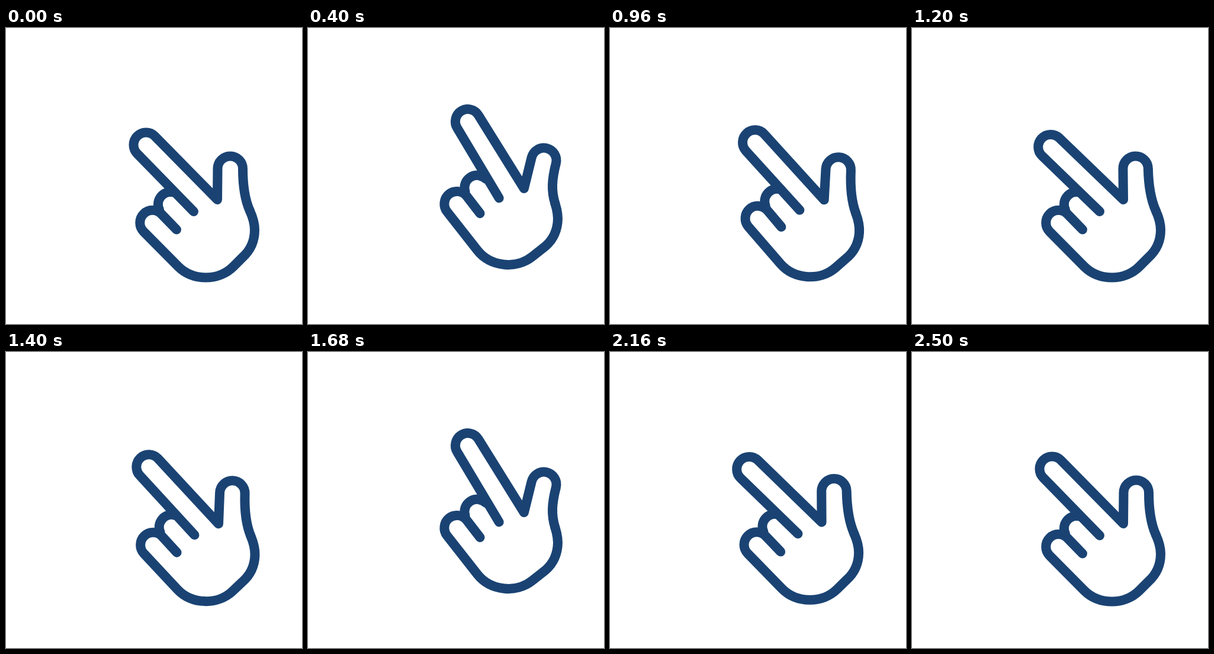
Recreate the animation shown at these times as an HTML page without scripts. Size 500x500 px, loop 3 s.

```html
<!DOCTYPE html>
<html lang="en">
<head>
<meta charset="utf-8">
<title>Tapping hand</title>
<style>
  html, body { margin: 0; width: 100%; height: 100%; overflow: hidden; background: #fff; }
  svg { display: block; width: 100vw; height: 100vh; }

  path {
    fill: none;
    stroke: #1a4373;
    stroke-width: 16;
    stroke-linecap: round;
    stroke-linejoin: round;
  }

  .hand {
    transform-box: view-box;
    transform-origin: 348px 359px;
    animation: lift 3s linear infinite, tilt 3s linear infinite;
  }
  .digits { animation: flex 3s linear infinite; }
  .knuckle { animation: follow 3s linear infinite; }

  @keyframes lift {
    0%, 33.3%, 46.667%, 76%, 100% { translate: 0 0; }
    5.333% { translate: 0 0; animation-timing-function: ease-in-out; }
    13.333%, 58.667% { translate: 0 -20.5px; animation-timing-function: ease-in; }
    22% { translate: 0 -9.5px; animation-timing-function: ease-out; }
    32% { translate: 0 -.5px; }
    46.667% { animation-timing-function: ease-in-out; }
    56% { translate: 0 -20.5px; }
    64.667% { translate: 0 -15.3px; animation-timing-function: cubic-bezier(.3, .3, .6, 1); }
  }

  @keyframes tilt {
    0%, 38.333%, 40.667%, 74.667%, 100% { rotate: 0deg; }
    5.333% { rotate: 0deg; animation-timing-function: ease-in-out; }
    13.333%, 58.667% { rotate: 6.6deg; animation-timing-function: ease-in; }
    22% { rotate: 3.6deg; }
    32% { rotate: 3.9deg; animation-timing-function: ease-in-out; }
    40.667% { animation-timing-function: ease-in; }
    46.667% { rotate: 1.65deg; animation-timing-function: ease-out; }
    56% { rotate: 6.6deg; }
    64.667% { rotate: 4.95deg; animation-timing-function: cubic-bezier(.3, .3, .6, 1); }
  }

  /* Poses of finger and thumb: rest, raised, pressed */
  @keyframes flex {
    0%, 5.333%, 24%, 44%, 46.667%, 69.333%, 83.333%, 100% {
      d: path("M317 310L221.7 212.4A1 1 0 0 1 251.3 182.6L357 290L357.5 237.7A1 1 0 0 1 400 237.7C400 264 403 289 412 309");
    }
    13.333%, 56%, 58.667% {
      d: path("M317 311L233.2 201.6A1 1 0 0 1 266.2 175.8L357 290L363.8 236.4A1 1 0 0 1 405.8 242C402 269 403 289 412 309");
    }
    37%, 73.333% {
      d: path("M317 310L218.2 218.9A1 1 0 0 1 246.8 188.1L357 290L355.6 238.2A1 1 0 0 1 398 237.2C399 264 403 289 412 309");
    }
    5.333%, 46.667% { animation-timing-function: ease-in-out; }
    13.333% { animation-timing-function: cubic-bezier(.4, .1, .7, .8); }
    24% { animation-timing-function: ease-out; }
    58.667% { animation-timing-function: cubic-bezier(.5, 0, .8, .6); }
    73.333% { animation-timing-function: ease-in-out; }
  }

  @keyframes follow {
    0%, 5.333%, 24%, 46.667%, 69.333%, 100% { d: path("M259 307A21 21 0 0 1 283 277.6"); }
    13.333%, 56%, 58.667% { d: path("M259 307A21 21 0 0 1 291 281.5"); }
  }
</style>
</head>
<body>
<svg viewBox="0 0 500 500">
  <g class="hand">
    <path class="digits" d="M317 310L221.7 212.4A1 1 0 0 1 251.3 182.6L357 290L357.5 237.7A1 1 0 0 1 400 237.7C400 264 403 289 412 309"/>
    <path class="knuckle" d="M259 307A21 21 0 0 1 283 277.6"/>
    <path d="M412 309C417 320 420 329 420 341C420 361 412 376 400 387L384 403C372 415 355 421.5 338 421.5C320 421.5 303 415 291 403L232.5 344A1 1 0 0 1 262.3 314L288 340.5"/>
  </g>
</svg>
</body>
</html>
```
